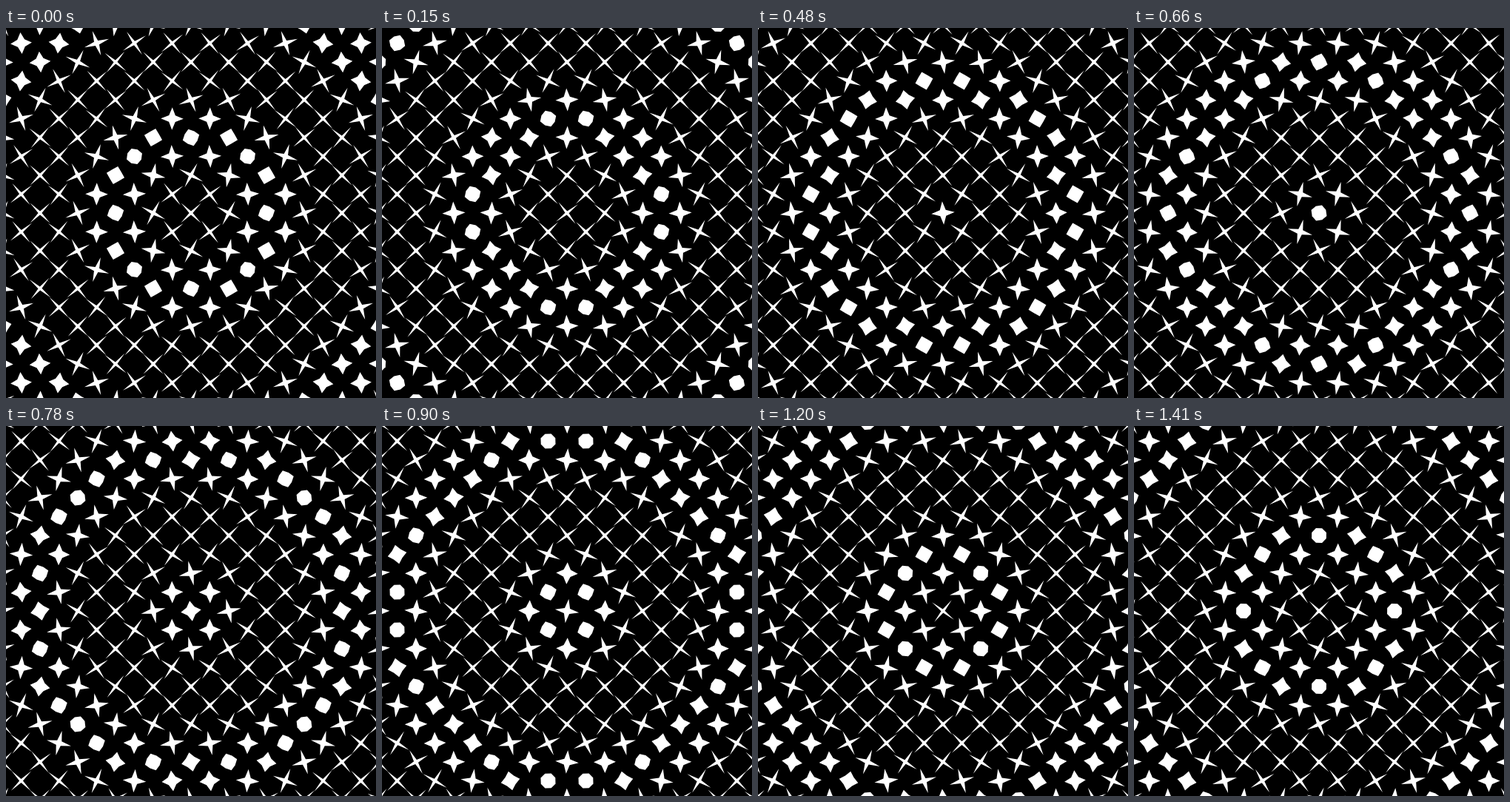
Write an HTML page with a canvas that moves like this. It is 500 by 500 pixels and loops after 1440 ms.

```html
<!DOCTYPE html>
<html lang="en">
<head>
<meta charset="utf-8">
<title>Star wave</title>
<style>
  html, body { margin: 0; width: 100%; height: 100%; overflow: hidden; background: #000; }
  canvas { display: block; }
</style>
</head>
<body>
<canvas id="stage" width="500" height="500"></canvas>
<script>
const ctx = document.getElementById('stage').getContext('2d');
const LOOP = 1440, STEP = 30;
const GAP = 25.5, REACH = 11;
const LONG = 19, SHORT = 2.4;
const WAVELENGTH = 200, LEAD = 0.032;

const smooth = p => p * p * (3 - 2 * p);
const cubic = p => p < 0.5 ? 4 * p ** 3 : 1 - 4 * (1 - p) ** 3;
const mix = (a, b, k) => a + (b - a) * k;

// Eight vertices: the long and short radii trade places while the star turns 135 degrees.
function star(x, y, phase, spin) {
  const p = phase - Math.floor(phase), k = cubic(p);
  const radii = [mix(LONG, SHORT, k), mix(SHORT, LONG, k)];
  const turn = spin * Math.PI * (0.25 + 0.75 * smooth(p));
  ctx.beginPath();
  for (let i = 0; i < 8; i++) {
    const a = turn + i * Math.PI / 4, r = radii[i % 2];
    ctx.lineTo(x + r * Math.cos(a), y + r * Math.sin(a));
  }
  ctx.fill();
}

function draw(time) {
  ctx.fillStyle = '#000';
  ctx.fillRect(0, 0, 500, 500);
  ctx.fillStyle = '#fff';
  for (let i = -REACH; i <= REACH; i++) {
    const spin = i % 2 ? -1 : 1; // neighbouring columns turn opposite ways
    for (let j = -REACH; j <= REACH; j++) {
      if ((i + j) % 2) continue;
      const x = i * GAP, y = j * GAP;
      const phase = time / LOOP + LEAD - Math.hypot(x, y) / WAVELENGTH;
      star(250 + x, 250 + y, phase, spin);
    }
  }
}

function tick() {
  const now = performance.now() % LOOP;
  draw(Math.floor(now / STEP) * STEP);
  requestAnimationFrame(tick);
}
tick();
</script>
</body>
</html>
```
